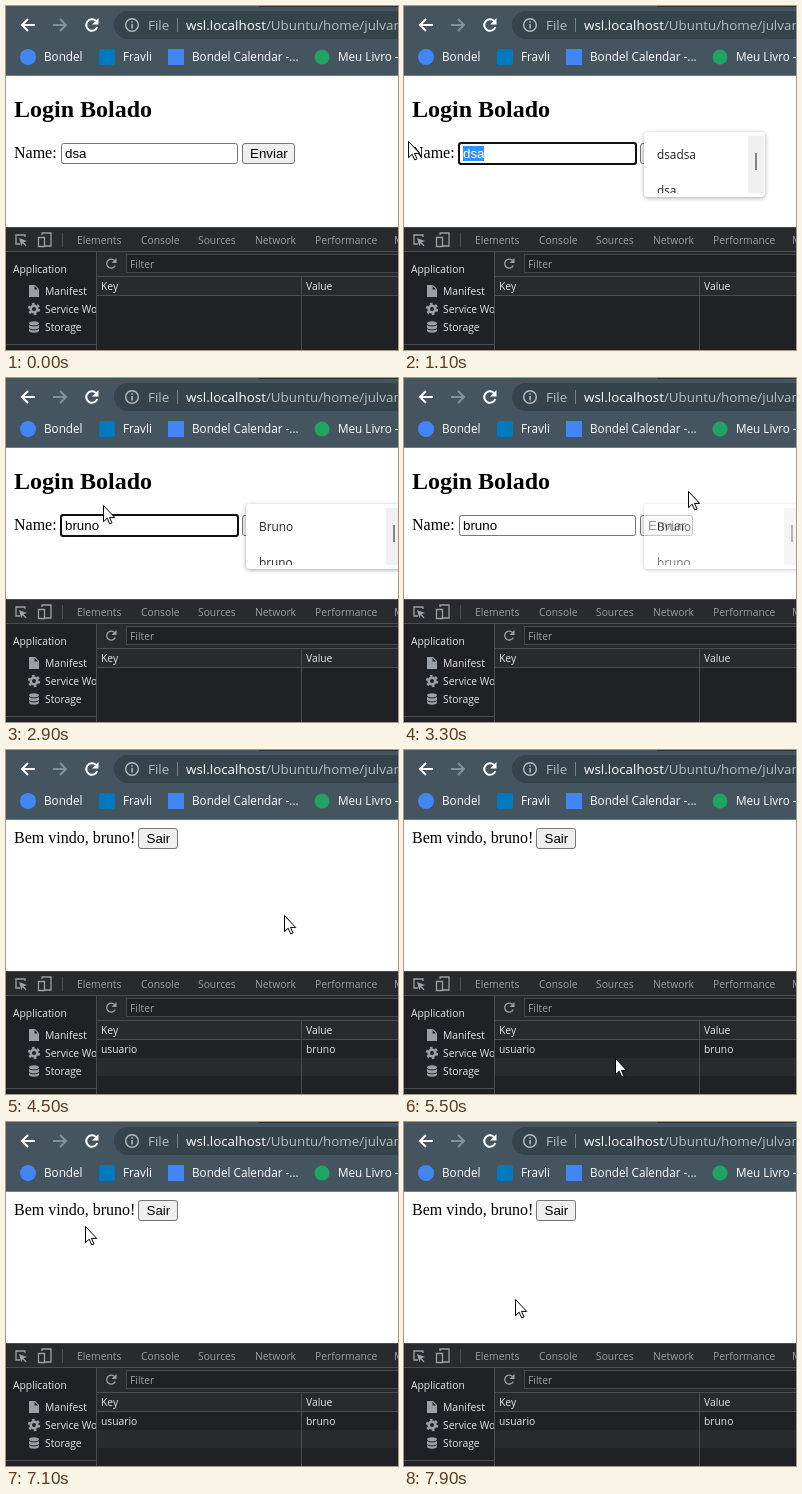
Write an HTML page that moves like this. It is 392 px wide and 344 px high and loops after 8 s.

```html
<!DOCTYPE html>
<html lang="pt">
<head>
<meta charset="utf-8">
<title>Login</title>
<style>
  html, body { margin: 0; width: 100%; height: 100%; overflow: hidden; background: #fff; }
  svg { display: block; width: 392px; height: 344px; font-family: "Open Sans", "Noto Sans", sans-serif; }
  text { white-space: pre; }
  .url { font-size: 13.4px; fill: #fff; }
  .dim { fill: #b4bec4; }
  .mark { font-size: 11.7px; fill: #fff; }
  .line { fill: none; stroke-width: 2; stroke: #fff; }
  .serif { font: 16px "Liberation Serif", "Times New Roman", serif; }
  .title { font-size: 24px; font-weight: bold; }
  .field { font: 13.333px "Liberation Sans", Arial, sans-serif; }
  .button { fill: #efefef; stroke: #767676; }
  .tools { font-size: 10.3px; fill: #e3e5e8; }
  .tab { fill: #9aa0a6; }
  .rule { stroke: #494c50; fill: none; }
  .icon { stroke: #9aa0a6; fill: none; stroke-width: 1.3; }
  #popup text { font-size: 11.8px; fill: #202124; }
  #sheet { filter: drop-shadow(0 1px 2px rgba(0, 0, 0, .35)); }
</style>
</head>
<body>
<svg viewBox="0 0 392 344">
  <defs>
    <clipPath id="side"><path d="M0 246h90v98H0z"/></clipPath>
    <clipPath id="list"><path d="M240 130h160v57H240z"/></clipPath>
  </defs>

  <!-- browser bar -->
  <path fill="#44555f" d="M0 0h392v70H0z"/>
  <path fill="#6f7e87" d="M0 69h392v1H0z"/>
  <path fill="#26323a" d="M253 0h139v1H253z"/>
  <rect x="108" y="5" width="320" height="28" rx="14" fill="#35434b"/>
  <circle id="hover" cx="86" cy="19" r="14" fill="#526169"/>
  <path class="line" d="M29 19H16M22 13l-6 6 6 6"/>
  <path class="line" style="stroke:#83919a" d="M47 19h13M54 13l6 6-6 6"/>
  <path class="line" d="M91.300 21a5.700 5.700 0 1 1-1.300-6"/>
  <path fill="#fff" d="M92.500 12v6.500H86z"/>
  <circle class="line" style="stroke:#b4bec4;stroke-width:1.4" cx="126" cy="19" r="6.300"/>
  <path fill="#b4bec4" d="M125.300 18h1.500v4.500h-1.500zM125.300 15.300h1.500v1.500h-1.500z"/>
  <text class="url dim" x="142" y="24">File</text>
  <path stroke="#75838b" d="M171.500 12v14"/>
  <text class="url" x="180" y="24">wsl.localhost<tspan class="dim">/Ubuntu/home/julvan</tspan></text>
  <circle cx="22" cy="51" r="8" fill="#4285f4"/>
  <rect x="93" y="43" width="16" height="16" rx="2" fill="#0079bf"/>
  <rect x="162" y="43" width="16" height="16" fill="#4285f4"/>
  <circle cx="316" cy="51" r="7.500" fill="#1fa463"/>
  <g class="mark">
    <text x="38" y="55">Bondel</text>
    <text x="117" y="55">Fravli</text>
    <text x="186" y="55">Bondel Calendar -...</text>
    <text x="332" y="55">Meu Livro -...</text>
  </g>

  <!-- page -->
  <path fill="#fff" d="M0 70h392v151H0z"/>
  <g id="form">
    <text class="serif title" x="8" y="111">Login Bolado</text>
    <text class="serif" x="8" y="152">Name:</text>
    <rect class="button" style="fill:#fff" x="55.500" y="137.500" width="176" height="20" rx="2"/>
    <rect id="ring" x="55" y="137" width="177" height="21" rx="2" fill="none" stroke="#101010" stroke-width="2"/>
    <path id="mark" fill="#3390ff" d="M59 140h21v15H59z"/>
    <text id="value" class="field" x="59" y="152"></text>
    <path id="caret" stroke="#000" d="M.5 140v15"/>
    <rect class="button" x="236.500" y="137.500" width="52" height="20" rx="2.500"/>
    <text class="field" x="244" y="152">Enviar</text>
  </g>
  <g id="home">
    <text class="serif" x="8" y="93">Bem vindo, bruno!</text>
    <rect class="button" x="132.500" y="78.500" width="39" height="20" rx="2.500"/>
    <text class="field" x="140.500" y="93">Sair</text>
  </g>
  <g id="popup">
    <rect id="sheet" x="240" y="126" height="65" rx="4" fill="#fff"/>
    <g clip-path="url(#list)">
      <text id="first" x="253" y="153"></text>
      <text id="second" x="253" y="189"></text>
    </g>
    <g id="scroll">
      <path fill="#f0f0f0" d="M344 130h16v57h-16z"/>
      <path fill="#858585" d="M351 147h2v17h-2z"/>
    </g>
  </g>

  <!-- developer tools -->
  <path fill="#202124" d="M0 221h392v123H0z"/>
  <path fill="#292a2d" d="M0 221h392v25H0zM91 246h301v44H91z"/>
  <path id="stripe" fill="#292a2d" d="M91 308h301v18H91z"/>
  <path class="rule" d="M0 221.500h392M0 245.500h392M56.500 227v14M90.500 246v98M91 270.500h301M91 289.500h301M295.500 270v74M0 338.500h90"/>
  <path class="icon" d="M19 231v-2h-9v9h4"/>
  <path fill="#9aa0a6" d="M13 232l8 3-3.500 1.300 3 3-1 1-3-3-1.200 3z"/>
  <path class="icon" d="M36 229v-2h9v13h-6M32.500 231.500h6v9h-6z"/>
  <g class="tools">
    <g class="tab" id="tabs"></g>
    <g clip-path="url(#side)">
      <text x="7" y="267">Application</text>
      <text x="39" y="289">Manifest</text>
      <text x="39" y="307">Service Workers</text>
      <text x="39" y="325">Storage</text>
    </g>
    <rect x="120.500" y="248.500" width="290" height="18" fill="#202124" stroke="#45484c"/>
    <text class="tab" x="124" y="262">Filter</text>
    <text x="95" y="284">Key</text>
    <text x="300" y="284">Value</text>
    <g id="row">
      <text x="95" y="303">usuario</text>
      <text x="300" y="303">bruno</text>
    </g>
  </g>
  <path class="icon" d="M109.300 259.500a4.500 4.500 0 1 1-.8-5"/>
  <path fill="#9aa0a6" d="M110.500 252v5h-5z"/>
  <g fill="#9aa0a6">
    <path d="M23 279h6l4 4v8H23z"/>
    <path fill="#202124" d="M28.500 280v3.500H32z"/>
    <circle cx="28" cy="303" r="3.300" fill="none" stroke="#9aa0a6" stroke-width="2.600"/>
    <circle cx="28" cy="303" r="5.200" fill="none" stroke="#9aa0a6" stroke-width="2" stroke-dasharray="2.720"/>
    <path d="M23 317.500c0-3 10-3 10 0v7c0 3-10 3-10 0z"/>
    <path fill="none" stroke="#202124" d="M23 318c0 2.500 10 2.500 10 0M23 322c0 2.500 10 2.500 10 0"/>
  </g>

  <g id="pointer">
    <path id="arrow" fill="#fff" stroke="#000" stroke-linejoin="round" d="M.5.500v16.200l3.700-3.500 2.500 5.700 2.300-1-2.500-5.500h5.200z"/>
    <path id="beam" fill="none" stroke="#000" d="M-3-7.500h2.500L0-7 .5-7.500H3M0-7V7M-3 7.500h2.500L0 7l.5.500H3"/>
  </g>
</svg>
<script>
  const LOOP = 8000, STEP = 100, LEAD = 20;
  const $ = id => document.getElementById(id);
  const set = (id, name, value) => $(id).setAttribute(name, value);
  const show = (id, on) => set(id, 'visibility', on ? 'visible' : 'hidden');

  const tabs = { Elements: 71, Console: 135, Sources: 192, Network: 249, Performance: 309, Memory: 388 };
  for (const name in tabs) {
    const label = document.createElementNS('http://www.w3.org/2000/svg', 'text');
    label.textContent = name;
    label.setAttribute('x', tabs[name]);
    label.setAttribute('y', 238);
    $('tabs').append(label);
  }

  // Pointer path: time, x, y
  const path = [
    [0, 400, 346], [300, 300, 210], [600, 92, 147], [700, 88, 147], [1100, 4, 135],
    [1700, 4, 135], [2200, 32, 132], [2700, 32, 132], [3300, 284, 113], [3600, 262, 147],
    [4000, 262, 147], [4500, 278, 165], [4900, 130, 300], [5300, 110, 309], [5700, 312, 307],
    [6200, 130, 110], [6500, 86, 18], [6800, 86, 18], [7300, 75, 150], [7600, 100, 197],
    [7900, 111, 177], [8000, 111, 177]
  ];
  const keys = [1200, 1700, 1800, 2000, 2100];
  const NAME = 'bruno';

  function pointerAt(t) {
    const i = path.findIndex(p => p[0] > t);
    const [t0, x0, y0] = path[i - 1], [t1, x1, y1] = path[i];
    const u = (t - t0) / (t1 - t0), k = u * u * (3 - 2 * u);
    return [x0 + (x1 - x0) * k, y0 + (y1 - y0) * k];
  }

  function draw(t) {
    const during = (from, to) => t >= from && t < to;
    const typed = t >= keys[0], home = t >= 3900;
    const marked = during(800, keys[0]);

    show('form', !home);
    show('home', home);
    show('row', home);
    show('stripe', home);
    show('hover', during(6400, 6900));

    set('ring', 'opacity', during(700, 3200) ? 1 : 0);
    $('value').textContent = typed ? NAME.slice(0, keys.filter(k => k <= t).length) : 'dsa';
    set('value', 'fill', marked ? '#fff' : '#000');
    set('mark', 'opacity', marked ? 1 : 0);
    const end = Math.round(59 + $('value').getComputedTextLength());
    set('caret', 'transform', `translate(${end} 0)`);
    set('caret', 'opacity', typed && t < 2700 ? 1 : 0);

    show('popup', during(800, 3600));
    set('popup', 'opacity', Math.min(1, Math.max(0, 1 - (t - 3100) / 500)));
    set('sheet', 'width', typed ? 170 : 121);
    set('scroll', 'transform', `translate(${typed ? 36 : 0} 0)`);
    $('first').textContent = typed ? 'Bruno' : 'dsadsa';
    $('second').textContent = typed ? NAME : 'dsa';

    const [x, y] = pointerAt(t).map(Math.round);
    const beam = !home && x > 55 && x < 232 && y > 137 && y < 158;
    set('pointer', 'transform', `translate(${x} ${y})`);
    show('arrow', !beam);
    show('beam', beam);
  }

  const start = performance.now();
  function tick() {
    const t = (performance.now() - start + LEAD) % LOOP;
    draw(Math.floor(t / STEP) * STEP);
    requestAnimationFrame(tick);
  }
  tick();
</script>
</body>
</html>
```
